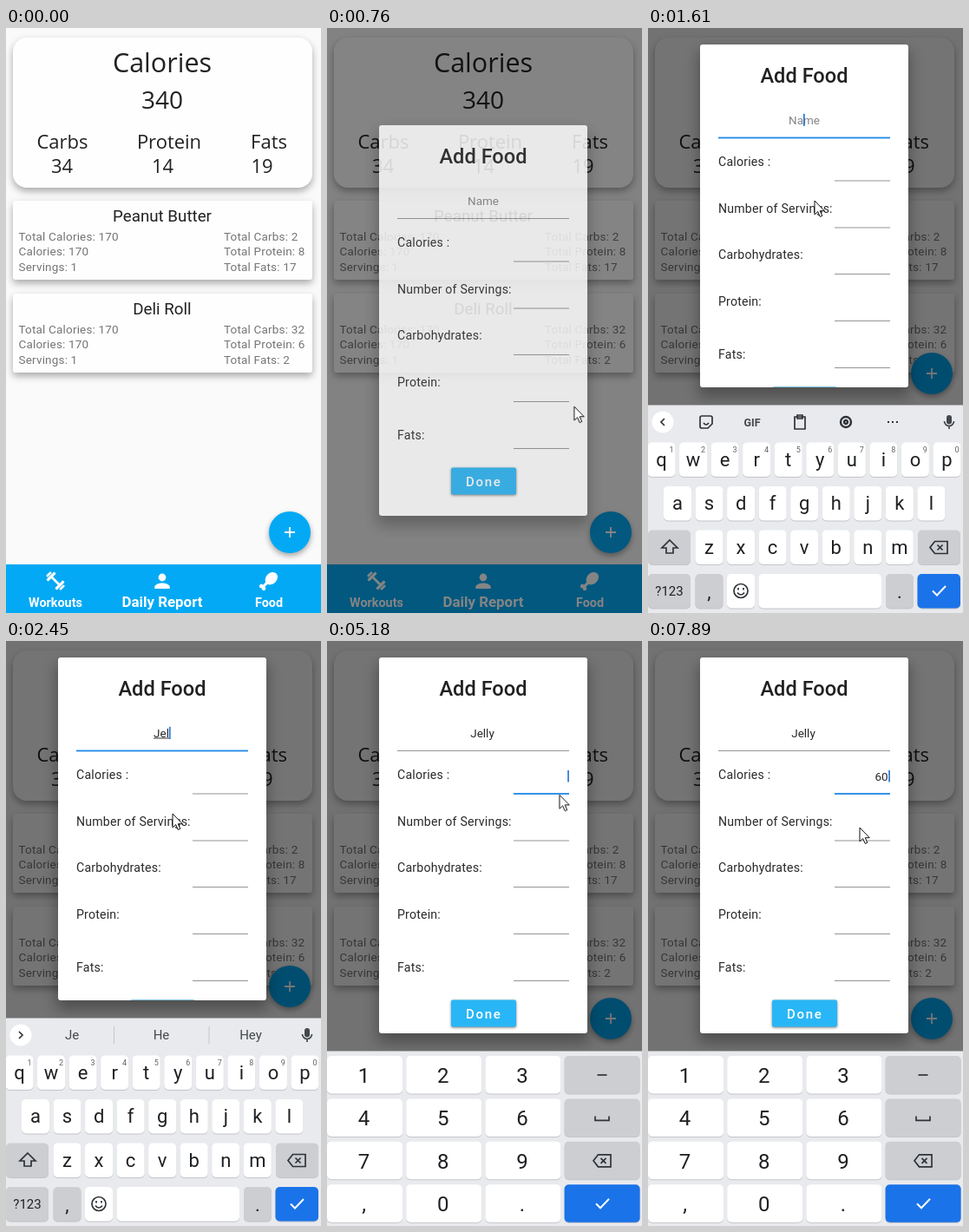
These frames come from a looping animation (363x674 px, 8 s). An HTML page:

```html
<!DOCTYPE html>
<html lang="en">
<head>
<meta charset="utf-8">
<title>Add food</title>
<style>
html, body { margin: 0; width: 100%; height: 100%; overflow: hidden; background: #fafafa; }
#stage { position: relative; width: 363px; height: 674px; overflow: hidden; background: #fafafa; }
svg { position: absolute; left: 0; top: 0; display: block; overflow: hidden; }
text { font-family: Roboto, sans-serif; fill: #212121; white-space: pre; }
.mid { text-anchor: middle; }
.head { font-family: "Open Sans", "Noto Sans", sans-serif; font-size: 22px; }
.card { fill: #fefefe; filter: drop-shadow(0 4px 4px rgba(0,0,0,.33)); }
.item { font-size: 18.75px; }
.info { font-size: 13.5px; letter-spacing: .18px; fill: #757575; }
.nav text { fill: #fff; font-weight: 700; font-size: 14.4px; }
.nav .on { font-size: 16.9px; }
.label { font-size: 14.13px; letter-spacing: .2px; fill: #2a2a2a; }
.value { font-size: 13.5px; fill: #2a2a2a; }
.line { fill: none; stroke: #2f3337; stroke-width: 1.7; }
.key { font-size: 22px; fill: #1f2023; }
.hint { font-size: 9px; fill: #5f6368; }
.word { font-size: 15px; fill: #44474b; }
.num { font-size: 24px; fill: #1f2023; }

#fab, #scrim, #dialog, #keys, #pointer { animation: 8s linear infinite; }
#fab { animation-name: fab; filter: drop-shadow(0 3px 3px rgba(0,0,0,.35)); }
#scrim { position: absolute; inset: 0; background: #000; animation-name: dim; }
#dialog {
  position: absolute; left: 60px; top: 19px; width: 240px; overflow: hidden;
  background: #fff; border-radius: 3px; animation-name: dialog;
  box-shadow: 0 9px 16px 2px rgba(0,0,0,.3);
}
#keys { position: absolute; inset: 0; animation-name: keys; }
#pointer { overflow: visible; animation-name: pointer; }

@keyframes dim {
  0%, 6.75% { opacity: 0 }
  8.625% { opacity: .43 }
  10.5%, 100% { opacity: .54 }
}
@keyframes dialog {
  0%, 6.75% { opacity: 0; height: 450px; transform: translateY(93px) }
  8.625% { opacity: .67 }
  10.5% { opacity: 1 }
  18.25% { height: 450px; transform: translateY(93px) }
  19.125% { height: 420px; transform: translateY(35px) }
  20.125%, 62.5% { height: 395px; transform: none }
  64.5%, 100% { opacity: 1; height: 433px; transform: none }
}
@keyframes fab {
  0%, 18.25% { transform: none }
  19.125% { transform: translateY(-120px) }
  20.125%, 62.5% { transform: translateY(-183px) }
  64.5%, 100% { transform: translateY(-146px) }
}
@keyframes keys {
  0%, 17.4% { opacity: 0; transform: translateY(240px) }
  18.25% { opacity: .2; transform: translateY(211px) }
  19.125% { opacity: .85; transform: translateY(60px) }
  20.125%, 100% { opacity: 1; transform: none }
}
@keyframes pointer {
  0%, .87% { opacity: 0; transform: translate(362px,620px) }
  .875% { opacity: 1; transform: translate(362px,620px) }
  3.75%, 6.25% { transform: translate(325px,584px) }
  8.625% { transform: translate(300px,473px) }
  10.5% { transform: translate(268px,395px) }
  13.75% { transform: translate(203px,222px) }
  15.6%, 37.6% { transform: translate(192px,199px) }
  38.625%, 40.6% { transform: translate(186px,206px) }
  42.5% { transform: translate(162px,185px) }
  43.5% { transform: translate(205px,160px) }
  45.375% { transform: translate(254px,152px) }
  47.25%, 52.1% { transform: translate(256px,154px) }
  53.125%, 62.5% { transform: translate(255px,154px) }
  66% { transform: translate(275px,190px) }
  69.6%, 94.8% { transform: translate(295px,239px) }
  95.75% { transform: translate(290px,236px) }
  98.625%, 100% { opacity: 1; transform: translate(244px,215px) }
}
</style>
</head>
<body>
<div id="stage">
  <svg width="363" height="674">
    <rect class="card" x="8" y="11" width="345" height="173" rx="16"/>
    <g class="head mid">
      <text class="head" x="180" y="51" style="font-size:30.5px">Calories</text>
      <text class="head" x="180" y="93" style="font-size:28px">340</text>
      <text class="head" x="65" y="139">Carbs</text>
      <text class="head" x="64.5" y="167">34</text>
      <text class="head" x="188" y="139">Protein</text>
      <text class="head" x="180.5" y="167">14</text>
      <text class="head" x="303" y="139">Fats</text>
      <text class="head" x="295" y="167">19</text>
    </g>
    <g id="foods"></g>
    <g class="nav mid">
      <rect y="618" width="363" height="56" fill="#03a9f4"/>
      <g transform="translate(57 637) rotate(45)" fill="#fff">
        <rect x="-6" y="-1.3" width="12" height="2.6"/>
        <rect x="-8.6" y="-6.5" width="3.2" height="13" rx="1"/>
        <rect x="5.4" y="-6.5" width="3.2" height="13" rx="1"/>
        <rect x="-12" y="-3.6" width="2.6" height="7.2" rx="1"/>
        <rect x="9.4" y="-3.6" width="2.6" height="7.2" rx="1"/>
      </g>
      <g fill="#fff">
        <circle cx="180" cy="633" r="4.4"/>
        <path d="M171.3 646v-2.2c0-3 5.800-4.400 8.700-4.400s8.700 1.400 8.700 4.400v2.200z"/>
      </g>
      <g transform="translate(303 637) rotate(-45)" fill="#fff">
        <ellipse cx="4" rx="8" ry="6.300"/>
        <rect x="-10" y="-1.600" width="9" height="3.200"/>
        <circle cx="-10.500" cy="-2" r="2.300"/>
        <circle cx="-10.500" cy="2" r="2.300"/>
      </g>
      <text x="57" y="667">Workouts</text>
      <text class="on" x="180" y="666.5">Daily Report</text>
      <text x="303" y="667">Food</text>
    </g>
    <g id="fab">
      <circle cx="327" cy="581" r="24" fill="#03a9f4"/>
      <path d="M321 581h12M327 575v12" stroke="#fff" stroke-width="1.8"/>
    </g>
  </svg>

  <div id="scrim"></div>

  <div id="dialog">
    <svg width="240" height="450" viewBox="60 19 240 450">
      <text class="mid" x="180" y="62.5" font-size="23.6" font-weight="500">Add Food</text>
      <text class="value mid" id="name" y="110.5"></text>
      <rect id="compose" y="111.500" height="1" fill="#333"/>
      <rect id="nameLine" x="81" width="198"/>
      <g id="rows"></g>
      <text class="value" id="amount" x="276.700" y="160.5" text-anchor="end"></text>
      <rect id="amountLine" x="215" width="64"/>
      <rect id="caret" width="1.700" fill="#2979d8"/>
      <g style="filter:drop-shadow(0 1px 1.5px rgba(0,0,0,.5))">
        <rect x="143" y="413.500" width="75" height="31" rx="2" fill="#29b6f6"/>
      </g>
      <text x="160" y="434.5" font-size="15" font-weight="500" letter-spacing="1.7" style="fill:#fff">Done</text>
    </svg>
  </div>

  <div id="keys">
    <svg width="363" height="674" id="letters"></svg>
    <svg width="363" height="674" id="digits"></svg>
  </div>

  <svg id="pointer" width="14" height="21">
    <path d="M0 0V16L3.700 12.600L6.300 18.500L8.800 17.400L6.300 11.700H11.300Z" fill="#fff" stroke="#111"/>
  </svg>
</div>

<script>
const $ = id => document.getElementById(id);
const put = (x, y, text, cls) => `<text class="${cls}" x="${x}" y="${y}">${text}</text>`;
const icon = (x, y, d, style = '') =>
  `<path class="line" transform="translate(${x} ${y})" d="${d}" style="${style}"/>`;

const GREY = '#ccced2', BLUE = '#1a73e8';
const BACK = 'M-10 0L-4.500-7H10V7H-4.500ZM-1.500-3L4.500 3M4.500-3L-1.500 3';
const CHECK = 'M-7 0L-2 5L8-5.500';
const WHITE_LINE = 'stroke:#fff;stroke-width:2';

// Food cards
const foods = [
  ['Peanut Butter', 199, 2, 8, 17],
  ['Deli Roll', 306, 32, 6, 2],
];
$('foods').innerHTML = foods.map(([name, y, carbs, protein, fats]) => {
  const left = ['Total Calories: 170', 'Calories: 170', 'Servings: 1'];
  const right = ['Total Carbs: ' + carbs, 'Total Protein: ' + protein, 'Total Fats: ' + fats];
  const column = (x, list) => list.map((s, i) => put(x, y + 45.5 + i * 17.8, s, 'info')).join('');
  return `<rect class="card" x="8" y="${y}" width="345" height="91" rx="3"/>` +
    put(180, y + 24, name, 'item mid') + column(14.5, left) + column(251, right);
}).join('');

// Form rows: label, baseline, underline
const rows = [
  ['Calories :', 158.5, 0],
  ['Number of Servings:', 212.5, 230],
  ['Carbohydrates:', 266, 283.5],
  ['Protein:', 320, 337.5],
  ['Fats:', 380.5, 391.5],
];
$('rows').innerHTML = rows.map(([label, y, line]) => put(81, y, label, 'label') +
  (line ? `<rect x="215" y="${line - .5}" width="64" height="1" fill="#949494"/>` : '')).join('');

// Keyboards
function key(x, y, w, h, fill = '#fff') {
  const box = (dy, c) => `<rect x="${x}" y="${y + dy}" width="${w}" height="${h}" rx="5" fill="${c}"/>`;
  return box(1, '#c3c5c9') + box(0, fill);
}
const panel = y => `<rect y="${y}" width="363" height="${674 - y}" fill="#e8eaed"/>`;

function letterRow(chars, first, y, hints) {
  return [...chars].map((c, i) => {
    const x = first + i * 36.55;
    return key(x - 16, y, 32, 39.5) + put(x, y + 27, c, 'key mid') +
      (hints ? put(x + 11.5, y + 11, (i + 1) % 10, 'hint mid') : '');
  }).join('');
}

const toolbar =
  icon(17, 454, 'M2-4L-2 0L2 4') +
  icon(67, 454, 'M-7-5q0-2 2-2H5q2 0 2 2V2L2 7H-5q-2 0-2-2ZM-3 1q3 4 6 0') +
  put(120, 458.5, 'GIF', 'word mid" style="font-size:12.5px;font-weight:700') +
  icon(175, 454, 'M-6-6H6V8H-6ZM-3-8H3V-4H-3Z') +
  icon(228, 454, 'M-6 0a6 6 0 1 0 12 0a6 6 0 1 0-12 0M-2 0a2 2 0 1 0 4 0a2 2 0 1 0-4 0', 'stroke-width:2.4') +
  icon(282, 454, 'M-6 0h2M-1 0h2M4 0h2', 'stroke-width:2');

$('letters').innerHTML = panel(434.5) +
  '<circle cx="17" cy="454" r="12.500" fill="#fff"/>' +
  `<g id="tools">${toolbar}</g>` +
  '<g id="words">' + icon(17, 454, 'M-2-4L2 0L-2 4') +
  '<path d="M124.500 444v20M234 444v20" stroke="#c4c7cb"/>' +
  [76, 179, 282].map(x => put(x, 459, '', 'word mid')).join('') + '</g>' +
  '<rect x="344" y="446" width="6" height="10.500" rx="3" fill="#44474b"/>' +
  icon(347, 454, 'M-5.500-1a5.500 5.500 0 0 0 11 0M0 4.500V8', 'stroke:#44474b') +
  letterRow('qwertyuiop', 15.5, 477.5, true) +
  letterRow('asdfghjkl', 34, 528) +
  letterRow('zxcvbnm', 70.5, 578.5) +
  key(0, 578.5, 49, 39.5, GREY) + icon(25, 598, 'M0-8L9 1H4V7H-4V1H-9Z') +
  key(311, 578.5, 49, 39.5, GREY) + icon(335, 598.5, BACK) +
  key(0, 629, 49, 39.5, GREY) + put(24.5, 654, '?123', 'mid" font-size="15') +
  key(54.5, 629, 32, 39.5, GREY) + put(70.5, 657, ',', 'key mid') +
  key(91, 629, 32, 39.5) +
  icon(107, 648.5, 'M-8 0a8 8 0 1 0 16 0a8 8 0 1 0-16 0M-4 2q4 5 8 0M-3-3.500v2.500M3-3.500v2.500') +
  key(127.5, 629, 141.5, 39.5) +
  key(274, 629, 32, 39.5, GREY) + put(290, 657, '.', 'key mid') +
  key(310.5, 629, 49.5, 39.5, BLUE) + icon(335, 648.5, CHECK, WHITE_LINE);

const pad = ['123-', '456_', '789<', ',0.>'];
const padIcons = { '-': 'M-5.500 0H5.500', '_': 'M-8-2V3H8V-2', '<': BACK, '>': CHECK };
$('digits').innerHTML = panel(472.5) + pad.map((row, r) => [...row].map((c, i) => {
  const y = 478 + r * 49.4, x = i * 91.2;
  const face = padIcons[c]
    ? icon(317, y + 22, padIcons[c], c === '>' ? WHITE_LINE : '')
    : put(x + 42.5, y + 31, c, 'num mid');
  return key(x, y, 87, 43.5, i < 3 ? '#fff' : c === '>' ? BLUE : GREY) + face;
}).join('')).join('');

// Timed states: [start, value]
const FOCUS_NAME = 1380, FOCUS_AMOUNT = 4880, SWAP = 4960;
const typed = [[0, ''], [2220, 'J'], [2370, 'Je'], [2450, 'Jel'], [2620, 'Jell'], [2770, 'Jelly']];
const amounts = [[0, ''], [6730, '6'], [6880, '60']];
const hints = [
  [0, ''], [2220, 'J I Just'], [2450, 'Je He Hey'], [2620, 'Jel Gel Help'],
  [2770, 'Jell Tell Jelly'], [2920, 'Jelly Kelly Jellyfish'],
];
const blinks = [
  [0, 0], [FOCUS_NAME, 1], [1990, 0], [2220, 1], [3400, 0], [3930, 1], [4420, 0],
  [FOCUS_AMOUNT, 1], [5570, 0], [6100, 1], [6580, 0], [6730, 1], [7430, 0], [7890, 1],
];
const at = (list, t) => list.findLast(s => s[0] <= t)[1];

const set = (el, attrs) => { for (const k in attrs) el.setAttribute(k, attrs[k]); };
const show = (el, on) => { el.style.display = on ? '' : 'none'; };
const underline = (el, y, on) => set(el, {
  y: y - (on ? .9 : .5), height: on ? 1.8 : 1, fill: on ? '#1e88e5' : '#949494',
});
const words = $('words').querySelectorAll('text');

function draw(t) {
  const name = at(typed, t), hint = at(hints, t);
  const onAmount = t >= FOCUS_AMOUNT, onName = t >= FOCUS_NAME && !onAmount;

  const label = $('name');
  label.textContent = name || 'Name';
  label.style.fill = name ? '' : '#858585';
  set(label, { x: name ? 179 : 180 });
  const width = name ? label.getComputedTextLength() : 0;
  set($('compose'), { x: 179 - width / 2, width: onName ? width : 0 });
  $('amount').textContent = at(amounts, t);

  underline($('nameLine'), 126.5, onName);
  underline($('amountLine'), 176, onAmount);
  set($('caret'), onAmount
    ? { x: 277.2, y: 149, height: 13.5 }
    : { x: 179 + width / 2, y: 98.8, height: 14.2 });
  show($('caret'), at(blinks, t));

  show($('tools'), !hint);
  show($('words'), hint);
  hint.split(' ').forEach((w, i) => { words[i].textContent = w; });
  show($('letters'), t < SWAP);
  show($('digits'), t >= SWAP);
}

const start = performance.now();
function tick() {
  draw((performance.now() - start) % 8000);
  requestAnimationFrame(tick);
}
tick();
</script>
</body>
</html>
```
